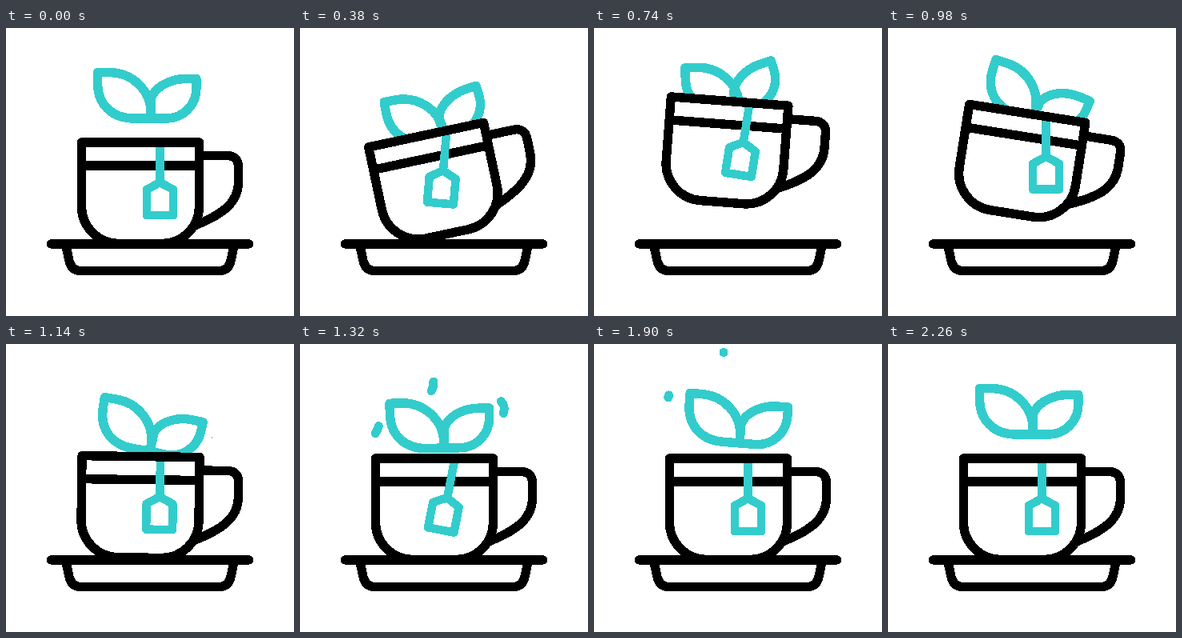
Animation, 360 px wide and 360 px high, one loop 2.4 s. Source, as an HTML page without scripts:

```html
<!DOCTYPE html>
<html lang="en">
<head>
<meta charset="utf-8">
<title>Tea cup</title>
<style>
  html, body { margin: 0; width: 100%; height: 100%; overflow: hidden; background: #fff; }
  svg { display: block; width: 100%; height: 100%; shape-rendering: crispEdges; }
  path { fill: none; stroke: #000; stroke-width: 11.4; stroke-linecap: round; stroke-linejoin: round; }
  .teal path { stroke: #33cccc; }
  .solid { fill: #fff; stroke: none; }

  .cup, .cup-tilt, .leaves, .leaf, .tag, .drops path {
    animation: 2400ms cubic-bezier(.37, 0, .63, 1) infinite;
  }
  .cup { animation-name: hop; }
  .cup-tilt { transform-origin: 168px 193px; animation-name: tilt; }
  .tag { transform-origin: 192.5px 149px; animation-name: swing; }
  .tag path { stroke-width: 10.5; stroke-linecap: butt; }
  .leaves { animation-name: float; }
  .leaf { transform-origin: 181px 113px; }
  .left { animation-name: sway-left; }
  .right { animation-name: sway-right; }
  .drops path { stroke-width: 0; stroke-dasharray: var(--len) 60; animation-name: rise, shrink; }
  .drops .brief { animation-name: rise, shrink-early; }

  @keyframes hop {
    0% { translate: 0 0; }
    15.83% { translate: 0 -10.4px; animation-timing-function: cubic-bezier(.3, .2, .5, 1); }
    32.5% { translate: -2.2px -52px; animation-timing-function: cubic-bezier(.33, 0, .67, .33); }
    47.9%, 100% { translate: 0 0; }
  }
  @keyframes tilt {
    0% { rotate: 0deg; }
    15.83% { rotate: -12deg; }
    38.3% { rotate: 9.7deg; animation-timing-function: cubic-bezier(.33, 0, .67, .33); }
    47.9%, 100% { rotate: 0deg; }
  }
  @keyframes swing {
    0% { rotate: 0deg; }
    15.83% { rotate: 17deg; animation-timing-function: ease-in; }
    30.83% { rotate: 4.6deg; animation-timing-function: ease-out; }
    40.83% { rotate: -9deg; }
    55% { rotate: 11deg; }
    66% { rotate: -4deg; }
    76%, 100% { rotate: 0deg; }
  }
  @keyframes float {
    0% { translate: 0 0; }
    15.83% { translate: 0 24px; animation-timing-function: cubic-bezier(.4, 0, .8, .8); }
    30.83% { translate: 1px -7.5px; animation-timing-function: ease-out; }
    35.4% { translate: 0 -17px; animation-timing-function: ease-in; }
    40.83% { translate: -.5px 1.5px; animation-timing-function: ease-out; }
    47.5% { translate: -1px 21px; }
    55% { translate: -1px 17px; animation-timing-function: linear; }
    79.17% { translate: 1px 11px; animation-timing-function: ease-out; }
    94.17%, 100% { translate: 0 0; }
  }
  @keyframes sway-left {
    0% { rotate: 0deg; }
    15.83% { rotate: -10.5deg; animation-timing-function: ease-in; }
    30.83% { rotate: -1.8deg; animation-timing-function: ease-out; }
    40.83% { rotate: 18deg; }
    55% { rotate: -1.5deg; }
    79.17% { rotate: 4.5deg; }
    94.17%, 100% { rotate: 0deg; }
  }
  @keyframes sway-right {
    0% { rotate: 0deg; }
    15.83% { rotate: -18deg; animation-timing-function: ease-in; }
    30.83% { rotate: -18deg; animation-timing-function: ease-out; }
    40.83% { rotate: 23deg; }
    55% { rotate: -.5deg; }
    79.17% { rotate: 4.5deg; }
    94.17%, 100% { rotate: 0deg; }
  }
  @keyframes rise {
    0%, 46.7% { translate: 7px 52px; animation-timing-function: cubic-bezier(.33, 1, .68, 1); }
    79.17%, 100% { translate: -4.5px var(--top); }
  }
  @keyframes shrink {
    0%, 46.7% { stroke-width: 0; stroke-dasharray: .01 60; }
    50.5% { stroke-width: 11; }
    55% { stroke-dasharray: var(--len) 60; }
    79.17% { stroke-width: 11; stroke-dasharray: var(--end) 60; }
    89%, 100% { stroke-width: 0; stroke-dasharray: .01 60; }
  }
  @keyframes shrink-early {
    0%, 46.7% { stroke-width: 0; stroke-dasharray: .01 60; }
    50.5% { stroke-width: 11; }
    55% { stroke-width: 11; stroke-dasharray: var(--len) 60; }
    74%, 100% { stroke-width: 0; stroke-dasharray: .01 60; }
  }
</style>
</head>
<body>
<svg viewBox="0 0 360 360">
  <g class="teal drops">
    <path style="--len: 12; --end: .01; --top: -37px" d="M166.5 47.5Q167.5 53 164 59"/>
    <path style="--len: 10; --end: 3; --top: -42px" d="M98 106Q97 111 94 115"/>
    <path class="brief" style="--len: 16; --end: 0; --top: -36px" d="M251 71.5Q257 77 254 87"/>
  </g>

  <g class="teal leaves">
    <path class="leaf left" d="M181 113H160C132 113 114.5 95 114.5 69V55.5H129C157 55.5 181 77 181 106Z"/>
    <path class="leaf right" d="M181 113H200C222 113 238 96 238 75V63.5H225C204 63.5 184 75 181 90Z"/>
  </g>

  <g class="cup">
    <g class="cup-tilt">
      <path d="M241.5 159.5H276Q290.5 159.5 290.5 174V192C290.5 220 268 234 236 247"/>
      <path class="solid" d="M94.5 143H241.5V223A46.5 46.5 0 0 1 195 269.5H141A46.5 46.5 0 0 1 94.5 223Z"/>
      <path d="M94.5 172H241.5"/>
      <g class="teal tag">
        <path d="M192.5 147V194M192.5 193L209 202V234H176V202Z"/>
      </g>
      <path d="M94.5 143H241.5V223A46.5 46.5 0 0 1 195 269.5H141A46.5 46.5 0 0 1 94.5 223Z"/>
    </g>
  </g>

  <path d="M56.5 270H303.5M74.5 270L79 291Q82 303.5 93 303.5H267Q278 303.5 281 291L285.5 270"/>
</svg>
</body>
</html>
```
